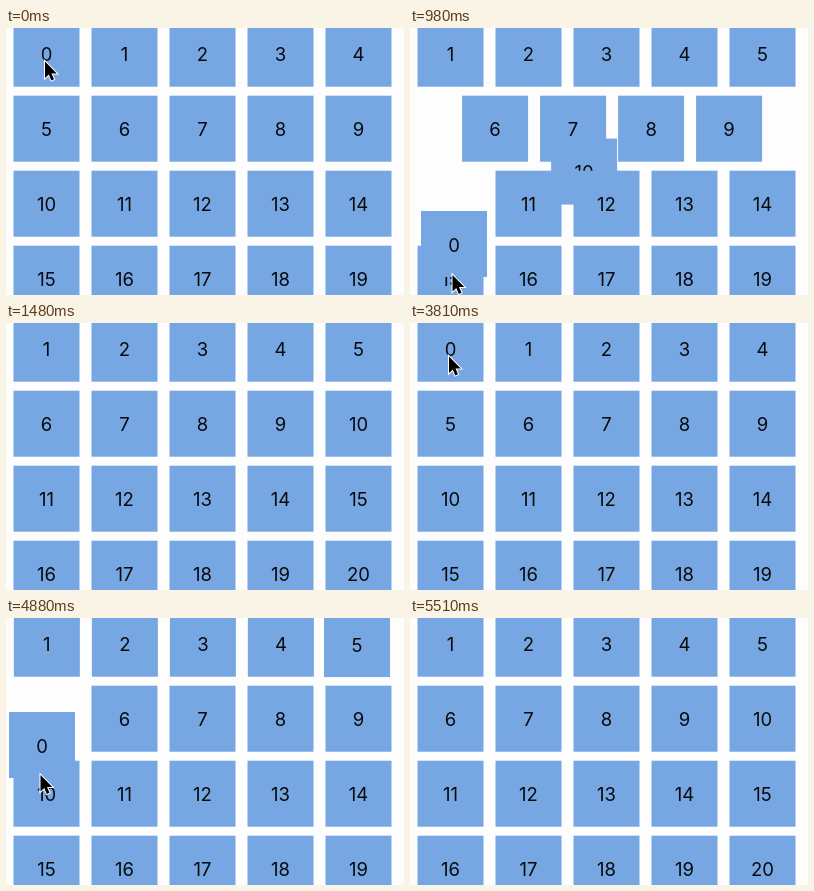
Recreate the animation shown at these times as an HTML page with a canvas. Size 398 by 267 pixels, loop 6440 ms.

```html
<!DOCTYPE html>
<html lang="en">
<head>
<meta charset="utf-8">
<title>Sortable grid</title>
<style>
html, body { margin: 0; width: 100%; height: 100%; overflow: hidden; background: #fdfdfd; }
canvas { display: block; }
</style>
</head>
<body>
<canvas id="stage" width="398" height="267"></canvas>
<script>
const ctx = document.getElementById('stage').getContext('2d');
const LOOP = 6440, STEP = 90, SHIFT = 250;
const COLS = 5, TILES = 25, SIZE = 66;

// rows: when each row starts to close up; path: [time, tile x, tile y, pointer y]
const drags = [
  {
    begin: 0, start: 270, beat: 890, end: 1480,
    rows: [625, 867, 1005, 1190],
    path: [
      [270, 7.5, -6, 34], [440, 5, 4, 44], [600, 3, 28, 64], [710, 2.5, 52, 94],
      [800, 3.5, 82, 130], [890, 5.5, 124, 180], [980, 11, 183, 247],
      [1070, 14, 232, 285], [1160, 15, 270, 330], [1250, 15, 300, 360]
    ]
  },
  {
    begin: 3810, start: 4280, beat: 4880, end: 5510,
    rows: [4640, 4932, 5071, 5220],
    path: [
      [4280, 7.5, -6, 34], [4430, 6.5, 6, 45], [4610, 5, 32, 66], [4700, 3, 48, 88],
      [4790, 2.5, 69, 118], [4880, 3, 94, 157], [4970, 4, 136, 205],
      [5060, 8, 190, 255], [5150, 12.5, 251.7, 300], [5240, 15, 300, 350]
    ]
  }
];

const clamp = v => Math.min(1, Math.max(0, v));
const mix = (a, b, k) => a + (b - a) * k;
const ease = k => k * k * (3 - 2 * k);
const slot = i => [7.5 + 78 * (i % COLS), -7.3 + 75 * Math.floor(i / COLS)];

function follow(path, t) {
  const next = path.findIndex(p => p[0] > t);
  if (next < 0) return path[path.length - 1].slice(1);
  const a = path[next - 1], b = path[next];
  const k = (t - a[0]) / (b[0] - a[0]);
  return [1, 2, 3].map(i => mix(a[i], b[i], k));
}

function drawTile(i, x, y) {
  ctx.fillStyle = '#76a7e2';
  ctx.fillRect(x, y, SIZE, SIZE);
  ctx.fillStyle = '#080a0d';
  ctx.fillText(i, x + SIZE / 2, y + 40.7);
}

const arrow = new Path2D('M0 0V16.6L3.8 13.1L6.3 19L9 17.8L6.5 12H11.8Z');

function drawPointer(x, y) {
  ctx.save();
  ctx.translate(x, y);
  ctx.lineWidth = 2;
  ctx.strokeStyle = '#fff';
  ctx.stroke(arrow);
  ctx.fillStyle = '#000';
  ctx.fill(arrow);
  ctx.restore();
}

function draw(now) {
  const t = now % LOOP;
  const drag = drags[t < drags[1].begin ? 0 : 1];
  const beat = drag.beat + Math.floor((t - drag.beat) / STEP) * STEP;
  const time = t < drag.end ? Math.max(drag.start, beat) : t;

  ctx.fillStyle = '#fdfdfd';
  ctx.fillRect(0, 0, 398, 267);
  ctx.font = '18.5px Inter, "Liberation Sans", sans-serif';
  ctx.textAlign = 'center';

  for (let i = 1; i < TILES; i++) {
    const begin = drag.rows[Math.floor((i - 1) / COLS)] ?? Infinity;
    const k = ease(clamp((time - begin) / SHIFT));
    const from = slot(i), to = slot(i - 1);
    drawTile(i, mix(from[0], to[0], k), mix(from[1], to[1], k));
  }

  // The dragged tile stays on top and trails the pointer
  const [x, y, pointerY] = t < drag.start ? [...slot(0), 33.5] : follow(drag.path, time);
  drawTile(0, x, y);
  drawPointer(x + 31.5, pointerY);
}

const origin = performance.now();
(function tick() {
  draw(performance.now() - origin);
  requestAnimationFrame(tick);
})();
</script>
</body>
</html>
```
